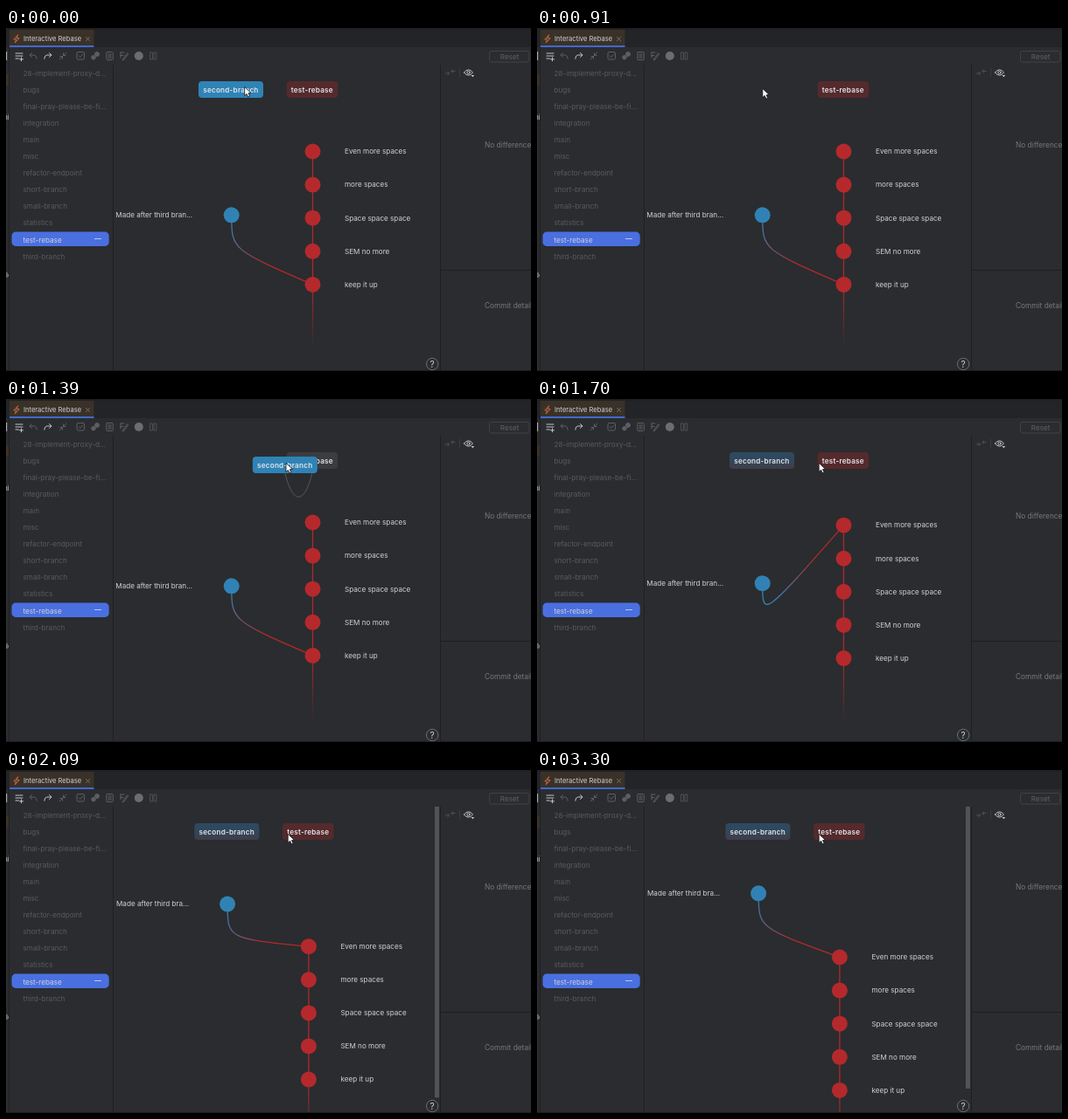
Recreate the animation shown at these times as an HTML page. Size 600 by 393 pixels, loop 3.39 s.

```html
<!DOCTYPE html>
<html lang="en">
<head>
<meta charset="utf-8">
<title>Interactive Rebase</title>
<style>
  html, body { margin: 0; width: 100%; height: 100%; overflow: hidden; background: #2a2c2f; }
  svg { display: block; width: 600px; height: 393px; }
  text { font: 400 8.14px Inter, "Open Sans", sans-serif; fill: #d0d2d7; white-space: pre; }
  .tab { font-size: 7.56px; }
  .dim { fill: #595b60; }
  .muted { fill: #75787d; font-size: 8.3px; }
  .off { fill: #606267; }
  .chip text { font-weight: 600; font-size: 8.2px; letter-spacing: .2px; fill: #e2e4e8; }
  .rule { stroke: #1e1f22; fill: none; }
  .icon { fill: none; stroke: #5c5e62; stroke-width: 1; stroke-linecap: round; stroke-linejoin: round; }
  .on { stroke: #c2c4c9; }
  .faint { stroke: #4e5054; }
</style>
</head>
<body>
<svg id="stage" viewBox="0 0 600 393">
  <defs>
    <linearGradient id="bend" gradientUnits="userSpaceOnUse">
      <stop offset="0" stop-color="#3182b4"/><stop offset=".55" stop-color="#b0292c"/>
    </linearGradient>
    <linearGradient id="fade" gradientUnits="userSpaceOnUse" x1="0" x2="0">
      <stop offset="0" stop-color="#b0292c"/><stop offset="1" stop-color="#b0292c" stop-opacity="0"/>
    </linearGradient>
    <linearGradient id="rebased" x2="0" y2="1">
      <stop offset="0" stop-color="#2c4a61"/><stop offset=".55" stop-color="#32465a"/>
      <stop offset="1" stop-color="#433c48"/>
    </linearGradient>
    <clipPath id="edge"><rect width="3.5" height="393"/></clipPath>
  </defs>

  <!-- window frame -->
  <rect width="600" height="22" fill="#222428"/>
  <rect width="600" height="1.5" fill="#1e1f22"/>
  <rect x="4" y="2" width="96.5" height="18.5" fill="#3a3128"/>
  <rect x="4" y="20" width="96.5" height="2" fill="#4169cf"/>
  <path class="icon" style="stroke:#c46a44" d="M13.5 8 L8.8 13 H11.6 L10.2 17 L15.2 11.7 H12.3 Z"/>
  <text class="tab" x="20" y="15.2">Interactive Rebase</text>
  <path class="icon" d="M91.5 10.5 l4 4 m0 -4 l-4 4" style="stroke:#808287;stroke-width:.8"/>
  <g clip-path="url(#edge)">
    <rect y="53" width="3" height="13" fill="#3d3223"/>
    <rect y="27" width="1.2" height="10" fill="#a5a7ab"/>
    <text x="-3" y="104.5">ni</text>
    <text x="0" y="286">le</text>
  </g>
  <path class="rule" d="M3.5 22 V393 M122.5 42 V393 M496.5 42 V393 M496.5 277.5 H600 M0 392.5 H600"/>

  <!-- toolbar -->
  <g class="icon">
    <path class="on" d="M11 29 h8 M11 32 h8 M11 35 h3.5 M17.5 33.8 v4 M15.5 35.8 h4"/>
    <path d="M29.5 28.5 l-2.5 2.5 l2.5 2.5 M27.2 31 h5 q3 .3 3 4.2"/>
    <path class="on" d="M49.5 28.5 l2.5 2.5 l-2.5 2.5 M51.8 31 h-5 q-3 .3 -3 4.2"/>
    <path d="M69 28 l-3.5 3.5 m0 -2.6 v2.6 h2.6 M61 36 l3.5 -3.5 m0 2.6 v-2.6 h-2.6"/>
    <rect x="81" y="27.5" width="8.5" height="8.5" rx="1.5"/>
    <path d="M83.2 31.8 l1.6 1.6 l3 -3.4"/>
    <g fill="#5c5e62"><circle cx="104" cy="30" r="2.5"/><circle cx="100" cy="33.7" r="2.3"/></g>
    <rect x="114.8" y="27.5" width="7.5" height="9" rx="1"/>
    <path d="M116.8 30 h3.5 M116.8 32 h3.5 M116.8 34 h3.5"/>
    <path d="M131 28 h4 M131 31.5 h3 M131 28 v6 M138.5 29 l-4.5 6 l-1 2 l2 -1 l4.5 -6 Z"/>
    <path class="faint" d="M165 28 h2.4 v8 h-2.4 Z M169.4 28 h2.4 v8 h-2.4 Z"/>
  </g>
  <circle cx="151.8" cy="32" r="5" fill="#6b6d71"/>
  <rect x="552.5" y="26.5" width="45.5" height="12.5" rx="2.5" fill="none" stroke="#404246"/>
  <text class="off" x="564.8" y="35.7">Reset</text>

  <!-- details side -->
  <g class="icon">
    <path class="faint" d="M502.5 52 h4 m-1.7 -1.8 l1.8 1.8 l-1.8 1.8 M513 49.5 h-4 m1.7 -1.8 l-1.8 1.8 l1.8 1.8"/>
    <path d="M518.5 46 v10" stroke="#393b3f"/>
    <path class="on" d="M523.5 51 q5 -6.5 10 0 q-5 6.5 -10 0 Z"/>
    <circle class="on" cx="528.5" cy="51" r="1.6"/>
  </g>
  <path d="M531.5 54 h3.8 l-1.9 2.2 Z" fill="#c2c4c9"/>
  <text class="muted" x="547" y="137.3">No differences</text>
  <text class="muted" x="547" y="321.3">Commit details</text>

  <g id="side"></g>
  <g id="graph"></g>
  <rect id="bar" x="490" y="42" width="5" fill="#515356"/>
  <circle cx="487.2" cy="385" r="6.7" fill="#2a2c2f" stroke="#73767b" stroke-width=".9"/>
  <text x="484.4" y="388.7" style="font-size:10px">?</text>
  <g id="chips"></g>
  <path id="pointer" d="M0 0 V10.2 L2.4 8 L4 11.6 L5.9 10.8 L4.3 7.3 L7.4 7.2 Z"
        fill="#fff" stroke="#111" stroke-width=".8" stroke-linejoin="round"/>
</svg>
<script>
const LOOP = 3390, RED = '#b5292c', BLUE = '#3182b4';
const ticks = [0, 90, 180, 300, 390, 520, 610, 700, 790, 910, 1000, 1120, 1210, 1300, 1390, 1520, 1610,
  1700, 1790, 1910, 2000, 2090, 2210, 2300, 2390, 2520, 2610, 2700, 2820, 2910, 3000, 3090, 3210, 3300];
const HIDE = 790, DRAG = 1000, DROP = 1682, SETTLE = 2335;

const byId = id => document.getElementById(id);
const set = (el, attrs) => { for (const k in attrs) el.setAttribute(k, attrs[k]); };
function add(parent, tag, attrs = {}, text) {
  const el = document.createElementNS('http://www.w3.org/2000/svg', tag);
  set(el, attrs);
  if (text) el.textContent = text;
  return parent.appendChild(el);
}
const show = (el, on) => { el.style.display = on ? '' : 'none'; };
const move = (el, x, y) => set(el, { transform: `translate(${x} ${y})` });

// Branch list
const side = byId('side');
const branches = ['28-implement-proxy-d...', 'bugs', 'final-pray-please-be-fi...', 'integration', 'main', 'misc',
  'refactor-endpoint', 'short-branch', 'small-branch', 'statistics', 'test-rebase', 'third-branch'];
add(side, 'rect', { x: 6.5, y: 233.6, width: 111.2, height: 16.3, rx: 4.5, fill: '#4a6fe0' });
add(side, 'path', { d: 'M101 241.5 h8', stroke: '#b9c6f2', 'stroke-width': 1 });
branches.forEach((name, i) =>
  add(side, 'text', { x: 19.5, y: 54.5 + i * 19.1, class: name === 'test-rebase' ? '' : 'dim' }, name));

// Commit graph
const graph = byId('graph');
const bend = add(graph, 'path', { fill: 'none', stroke: 'url(#bend)', 'stroke-width': 1.3 });
const spine = add(graph, 'path', { stroke: '#b0292c', 'stroke-width': 1.3 });
const tail = add(graph, 'rect', { width: 1.3, fill: 'url(#fade)' });
const commits = ['Even more spaces', 'more spaces', 'Space space space', 'SEM no more', 'keep it up'].map(label => {
  const g = add(graph, 'g');
  add(g, 'circle', { r: 9, fill: RED });
  add(g, 'text', { x: 36.5, y: 2.8 }, label);
  return g;
});
const own = add(graph, 'circle', { r: 9, fill: BLUE });
const ownLabel = add(graph, 'text');

// Branch chips
const chips = byId('chips');
function chip(name, width) {
  const g = add(chips, 'g', { class: 'chip' });
  const box = add(g, 'rect', { width, height: 19, rx: 4 });
  add(g, 'text', { x: 5.2, y: 12.7 }, name);
  return { g, box };
}
const target = chip('test-rebase', 58.6);
const link = add(chips, 'path', { fill: 'none', stroke: '#57595d', 'stroke-width': 1 });
const moved = chip('second-branch', 74);

// Linear interpolation over rows of [time, x, y]
function along(rows, t) {
  let i = 0;
  while (i < rows.length - 2 && t > rows[i + 1][0]) i++;
  const [a, b] = [rows[i], rows[i + 1]];
  const p = Math.min(1, Math.max(0, (t - a[0]) / (b[0] - a[0])));
  return [a[1] + (b[1] - a[1]) * p, a[2] + (b[2] - a[2]) * p];
}
const pointerPath = [[0, 272.7, 67.4], [390, 257.8, 69.4], [DRAG, 257.8, 69.4], [1390, 320, 73.4], [1610, 322.2, 73.2]];

function drawGraph(t) {
  const p = Math.min(1, Math.max(0, (t - DROP) / (SETTLE - DROP)));
  const dy = 73 * Math.sin(p * Math.PI / 2);
  const scrolls = dy > 45, shift = scrolls ? -4.6 : 0;
  const bx = 257.7 + shift, by = 214.3 - dy;
  const rx = 350.5 + shift, top = 141.5 + dy, last = top + 152.4;
  const end = t < DROP ? last : top;

  set(bend, { d: `M${bx} ${by} C${bx} ${by + 39.5} ${bx} ${by + 39.5} ${rx} ${end}` });
  set(byId('bend'), { x1: bx, y1: by, x2: rx, y2: end });
  set(spine, { d: `M${rx} ${top} V${last}` });
  set(byId('fade'), { y1: last, y2: last + 74 });
  set(tail, { x: rx - .65, y: last, height: Math.min(72, (scrolls ? 392 : 374) - last) });
  commits.forEach((g, i) => move(g, rx, top + i * 38.1));
  set(own, { cx: bx, cy: by });
  set(ownLabel, { x: scrolls ? 126 : 125.3, y: by + 2.8 });
  ownLabel.textContent = scrolls ? 'Made after third bra...' : 'Made after third bran...';
  show(byId('bar'), scrolls);
  set(byId('bar'), { height: 333 - (dy - 61) * 10 / 12 });
  return shift;
}

function drawChips(t, shift, x, y) {
  const dragging = t >= DRAG && t < DROP;
  const over = dragging && x > 285;
  move(target.g, 320.6 + shift, 61);
  set(target.box, { fill: over ? '#3b3c3f' : '#552a2d' });
  show(moved.g, t < HIDE || t >= DRAG);
  set(moved.box, { fill: t < DROP ? '#2f83b6' : 'url(#rebased)' });
  if (dragging) move(moved.g, x - 38.2, y - 7.4);
  else move(moved.g, 220 + shift, 61);
  show(link, over);
  set(link, { d: `M${x - 1} ${y + 12} C${x + 8} 122 342 122 351 80` });
  if (over) chips.insertBefore(link, target.g);
}

function draw(t) {
  const [x, y] = along(pointerPath, t);
  drawChips(t, drawGraph(t), x, y);
  move(byId('pointer'), x, y);
}

const start = performance.now();
function loop() {
  const now = (performance.now() - start) % LOOP;
  draw(ticks.findLast(at => at <= now) ?? 0);
  requestAnimationFrame(loop);
}
loop();
</script>
</body>
</html>
```
